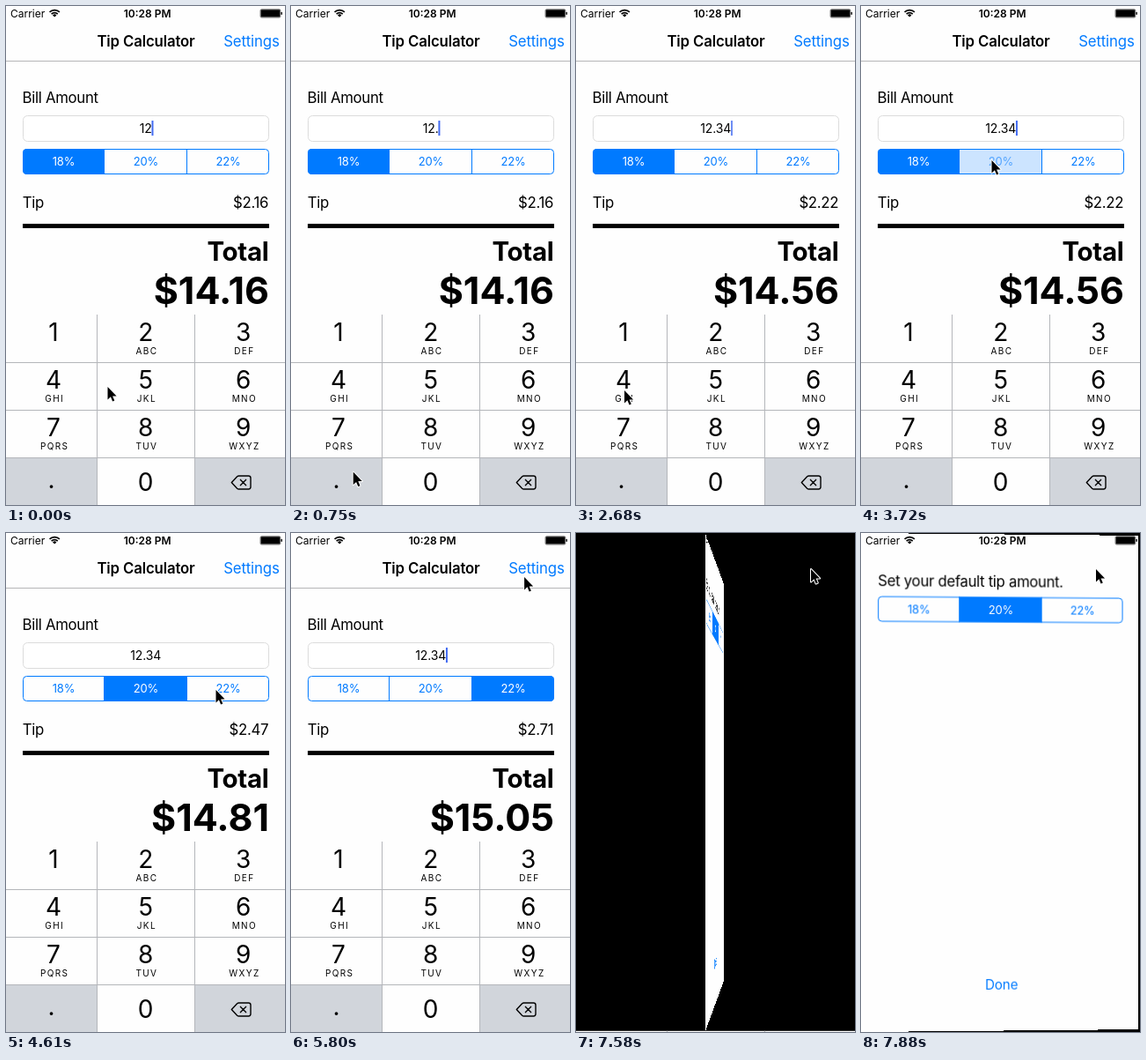
An HTML page for the animation above (8000 ms loop, 317 by 566 pixels).

```html
<!DOCTYPE html>
<html lang="en">
<head>
<meta charset="utf-8">
<title>Tip Calculator</title>
<style>
  html, body { margin: 0; width: 100%; height: 100%; overflow: hidden; background: #000; }
  #stage { position: relative; width: 317px; height: 566px; overflow: hidden; }
  #scene { perspective: 1229px; }
  .layer { position: absolute; left: 0; top: 0; width: 317px; height: 566px; }
  .page { background: #fefefe; }
  svg { display: block; position: absolute; left: 0; top: 0; }
  text { font-family: Inter, Roboto, "Liberation Sans", sans-serif; white-space: pre; }
</style>
</head>
<body>
<div id="stage">
  <svg width="0" height="0">
    <clipPath id="pill"><rect x="19" y="0" width="280" height="29" rx="4.5"/></clipPath>
  </svg>
  <div id="scene" class="layer">
    <div id="main" class="layer page"></div>
    <div id="settings" class="layer page"></div>
  </div>
  <div id="status" class="layer"></div>
  <div id="keypad" class="layer"></div>
  <div id="pointer" class="layer"></div>
</div>
<script>
const LOOP = 8000, TICK = 148.68;
const BLUE = '#007aff', PALE = '#cce4ff', GREY = '#d1d5db', WHITE = '#fefefe';
const $ = id => document.getElementById(id);
const clamp = v => Math.min(1, Math.max(0, v));
const smooth = v => { v = clamp(v); return v * v * (3 - 2 * v); };
const mix = (a, b, k) => a + (b - a) * k;
const pen = document.createElement('canvas').getContext('2d');

// Moments of user actions, in ms
const DOT = 580, THREE = 1625, FOUR = 2665, MID = 3855, HIGH = 4895, OPEN = 7125;
const FLIP = { start: 7280, length: 650 };

// Pointer moves: start, end, target x, target y
const HOME = [115, 432];
const MOVES = [
  [60, 560, 58, 538],
  [640, 1330, 259.3, 382.5],
  [1700, 2370, 54.5, 436],
  [2850, 3640, 148, 175],
  [3900, 4600, 238, 178],
  [5130, 5922, 266.5, 41]
];

const svg = body => `<svg width="317" height="566">${body}</svg>`;
const rect = (x, y, w, h, fill, extra = '') =>
  `<rect x="${x}" y="${y}" width="${w}" height="${h}" fill="${fill}" ${extra}/>`;
const path = (d, extra) => `<path d="${d}" ${extra}/>`;

function text(x, y, str, size, { anchor = 'start', weight = 400, fill = '#000', track = -0.018, alpha = 1 } = {}) {
  return `<text x="${x}" y="${y}" font-size="${size}" font-weight="${weight}" text-anchor="${anchor}" ` +
    `fill="${fill}" fill-opacity="${alpha}" letter-spacing="${(track * size).toFixed(3)}">${str}</text>`;
}

function statusBar() {
  const arc = r => {
    const k = r * Math.SQRT1_2;
    return `M${55.2 - k} ${12.6 - k}A${r} ${r} 0 0 1 ${55.2 + k} ${12.6 - k}`;
  };
  return svg(
    text(5, 12.6, 'Carrier', 12, { track: 0 }) +
    path(arc(8) + arc(5), 'fill="none" stroke="#000" stroke-width="1.7"') +
    path('M55.2 12.6L53 10.4A3.1 3.1 0 0 1 57.4 10.4Z', '') +
    text(160.7, 12.5, '10:28 PM', 12, { anchor: 'middle', weight: 600, track: 0 }) +
    rect(289, 3.7, 22.8, 9.4, 'none', 'rx="1.5" stroke="#000" stroke-opacity="0.5"') +
    rect(289.5, 4.2, 21.8, 8.4, '#000', 'rx="0.8"') +
    rect(312.4, 6.8, 1.4, 3.2, '#000', 'rx="0.7"')
  );
}

function segments(y, selected, pressed) {
  const edges = [19, 111.5, 205.5, 299], mids = [65.5, 159, 252.5];
  let fills = '', labels = '';
  ['18%', '20%', '22%'].forEach((label, i) => {
    const on = i === selected, down = i === pressed;
    if (on || down) fills += rect(edges[i], 0, edges[i + 1] - edges[i], 29, on ? BLUE : PALE);
    labels += text(mids[i], 19.2, label, 13,
      { anchor: 'middle', fill: on ? '#fff' : BLUE, alpha: down ? 0.6 : 1, track: -0.01 });
  });
  return `<g transform="translate(0 ${y})"><g clip-path="url(#pill)">${fills}</g>` +
    rect(19.5, 0.5, 279, 28, 'none', `rx="4" stroke="${BLUE}"`) +
    path('M111.5 0V29M205.5 0V29', `stroke="${BLUE}"`) + labels + '</g>';
}

function caretAlpha(t) {
  const period = 1028;
  const gap = ((t - 1470) % period + period) % period;
  return clamp((Math.min(gap, period - gap) - 150) / 36);
}

function mainPage(t) {
  const entry = t < DOT ? '12' : t < THREE ? '12.' : t < FOUR ? '12.3' : '12.34';
  const choice = t < MID ? 0 : t < HIGH ? 1 : 2;
  const pressed = t >= MID - 150 && t < MID ? 1 : t >= HIGH - 150 && t < HIGH ? 2 : -1;
  const bill = parseFloat(entry);
  const tip = bill * [0.18, 0.2, 0.22][choice];
  const money = v => '$' + v.toFixed(2);
  pen.font = '14px Inter, Roboto, "Liberation Sans", sans-serif';
  const caret = 159 + (pen.measureText(entry).width - 0.14 * entry.length) / 2;
  const end = { anchor: 'end' };
  return svg(
    text(159, 46, 'Tip Calculator', 16.8, { anchor: 'middle', weight: 600, track: -0.009 }) +
    text(310.6, 46, 'Settings', 16.8, { ...end, fill: BLUE, track: -0.01, alpha: t < OPEN ? 1 : 0.2 }) +
    rect(0, 62, 317, 1, '#b5b5b7') +
    text(18.5, 110, 'Bill Amount', 16.8) +
    rect(19.5, 124.5, 279, 29, '#fff', 'rx="5" stroke="#dcdcdc"') +
    text(158.7, 144, entry, 14, { anchor: 'middle', track: -0.01 }) +
    rect(caret - 0.5, 130, 2, 17, '#426bf2', `fill-opacity="${caretAlpha(t)}"`) +
    segments(162, choice, pressed) +
    text(18.7, 229, 'Tip', 16.8) +
    text(298.2, 229, money(tip), 16.8, end) +
    rect(19, 247, 280, 5, '#000') +
    text(298.5, 289, 'Total', 29.5, { ...end, weight: 700, track: -0.01 }) +
    text(299, 338, money(bill + tip), 43, { ...end, weight: 700, track: 0 })
  );
}

function settingsPage() {
  return svg(
    text(19, 60.4, 'Set your default tip amount.', 16.8) +
    segments(71.5, 1, -1) +
    text(159.7, 519, 'Done', 15.2, { anchor: 'middle', fill: BLUE, track: -0.005 })
  );
}

function keypad(t) {
  const lefts = [0, 103.5, 214.5, 317], mids = [54, 158.7, 269.7];
  const letters = ['', 'ABC', 'DEF', 'GHI', 'JKL', 'MNO', 'PQRS', 'TUV', 'WXYZ'];
  const mid = { anchor: 'middle', track: 0 };
  const down = t >= DOT && t < DOT + 100 ? '.' : t >= THREE && t < THREE + 100 ? '3' : '';
  let out = '';
  [...'123456789.0<'].forEach((key, i) => {
    const col = i % 3, y = 54 * Math.floor(i / 3);
    const special = key === '.' || key === '<';
    out += rect(lefts[col], y, lefts[col + 1] - lefts[col], 54, special !== (key === down) ? GREY : WHITE);
    if (i < 9) {
      out += text(mids[col], y + 30.3, key, 28, mid) +
        text(mids[col] + 1.2, y + 45.3, letters[i], 10, { anchor: 'middle', track: 0.14 });
    }
  });
  out += text(51.5, 196.5, '.', 28, mid) + text(158.5, 200, '0', 28, mid) +
    path('M256.3 190.5L262.6 183.8Q263.4 183 264.6 183H275.6Q278 183 278 185.4V195.6Q278 198 275.6 198H264.6Q263.4 198 262.6 197.2Z' +
      'M266 187L273 194M273 187L266 194', 'fill="none" stroke="#000" stroke-width="1.4" stroke-linejoin="round"') +
    path('M0 54.5H317M0 108.5H317M0 162.5H317M103.5 0V216M214.5 0V216', 'stroke="#b4b6ba" fill="none"');
  const y = 350 + 216 * smooth((t - 7225) / 374);
  return svg(`<g transform="translate(0 ${y.toFixed(1)})">${out}</g>`);
}

function pointer(t) {
  let [x, y] = HOME;
  for (const [from, to, tx, ty] of MOVES) {
    const k = smooth((t - from) / (to - from));
    x = mix(x, tx, k);
    y = mix(y, ty, k);
  }
  return svg(`<g transform="translate(${x.toFixed(1)} ${y.toFixed(1)})">` +
    path('M0.5 0V14.5L3.9 11.3L6.1 16.5L8.3 15.6L6.1 10.4H10.6Z',
      'stroke="#fff" stroke-width="2" paint-order="stroke" stroke-linejoin="round"') + '</g>');
}

// The near edge of the card stays in the screen plane while it turns.
function turn(el, deg) {
  const back = 158.5 * Math.abs(Math.sin(deg * Math.PI / 180));
  el.style.display = Math.abs(deg) < 90 ? 'block' : 'none';
  el.style.transform = deg ? `translateZ(${-back}px) rotateY(${deg}deg)` : 'none';
}

function draw(t) {
  const p = smooth(Math.pow(clamp((t - FLIP.start) / FLIP.length), 0.866));
  $('main').innerHTML = mainPage(t);
  $('keypad').innerHTML = keypad(t);
  $('pointer').innerHTML = pointer(t);
  turn($('main'), t > 7300 ? -180 * p : 0);
  turn($('settings'), 180 * (1 - p));
}

$('status').innerHTML = statusBar();
$('settings').innerHTML = settingsPage();
const began = performance.now();
let shown = -1;

function loop() {
  const t = (performance.now() - began) % LOOP;
  const step = Math.floor((t + 8) / TICK);
  if (step !== shown) draw((shown = step) * TICK);
  requestAnimationFrame(loop);
}
loop();
</script>
</body>
</html>
```
